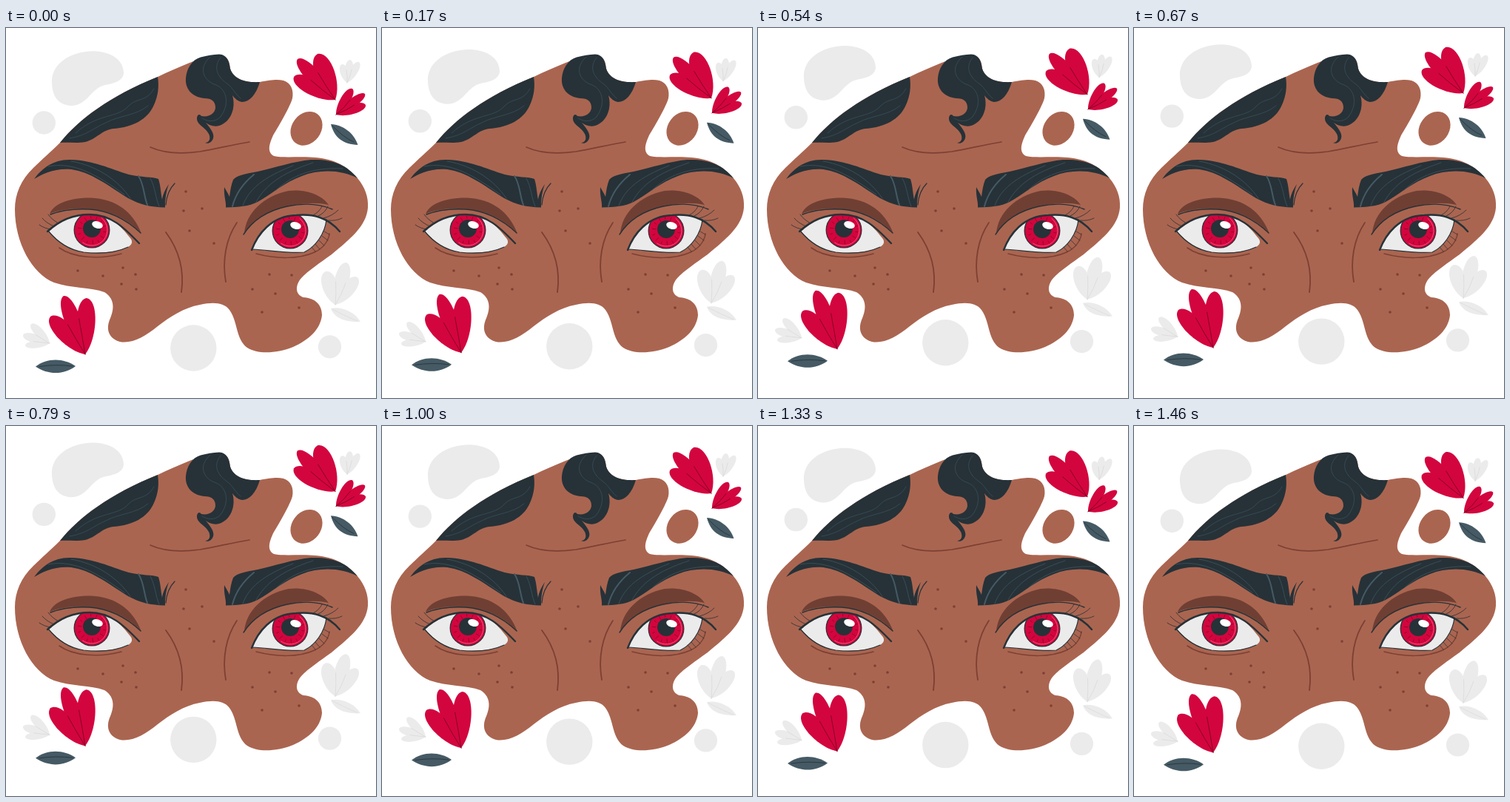
Write an HTML page with a canvas that moves like this. It is 500 px wide and 500 px high and loops after 1500 ms.

```html
<!DOCTYPE html>
<html lang="en">
<head>
<meta charset="utf-8">
<title>Angry eyes</title>
<style>
html, body { margin: 0; width: 100%; height: 100%; overflow: hidden; background: #fff; }
canvas { display: block; width: 100vw; height: 100vh; }
</style>
</head>
<body>
<canvas id="stage" width="500" height="500"></canvas>
<script>
const ctx = document.getElementById('stage').getContext('2d');
const LOOP = 1500, STEPS = 36, LIFT = 10, PHASE = 0.7;
const SKIN = '#aa6550', SHADE = '#703f33', CREASE = '#7c4033', DARK = '#263238';
const SLATE = '#455a64', RED = '#d3053e', WINE = '#7d0326', GRAY = '#ebebeb', GRAY_LINE = '#dcdcdc';

function fill(path, color) {
  ctx.fillStyle = color;
  ctx.fill(new Path2D(path));
}

function line(path, color, width) {
  ctx.strokeStyle = color;
  ctx.lineWidth = width;
  ctx.stroke(new Path2D(path));
}

function oval(x, y, rx, ry, color, angle = 0) {
  ctx.fillStyle = color;
  ctx.beginPath();
  ctx.ellipse(x, y, rx, ry, angle, 0, Math.PI * 2);
  ctx.fill();
}

const disc = (x, y, r, color) => oval(x, y, r, r, color);

// Each petal is [tip x, tip y, width], growing from a shared base.
function flower(x, y, petals, color, veinColor) {
  for (const [tipX, tipY, w] of petals) {
    const length = Math.hypot(tipX - x, tipY - y);
    ctx.save();
    ctx.translate(x, y);
    ctx.rotate(Math.atan2(tipY - y, tipX - x));
    ctx.scale(length, w);
    fill('M0 0C.3 -.72 .97 -.72 1 0C.97 .72 .3 .72 0 0Z', color);
    ctx.restore();
  }
  petals.slice(1).forEach(([tipX, tipY], i) => {
    const midX = (tipX + petals[i][0]) / 2 - x, midY = (tipY + petals[i][1]) / 2 - y;
    line(`M${x} ${y}Q${x + midX * .35 + 1} ${y + midY * .3} ${x + midX * .62} ${y + midY * .62}`, veinColor, .9);
  });
}

function leaf(path, vein, color, veinColor) {
  fill(path, color);
  line(vein, veinColor, .8);
}

function drawFloating() {
  fill('M62 75C60 50 85 31.5 118 31.2C145 32 159 45 159 61C158 72 145 75 134 77C115 81 110 105 88 105C70 104 63 92 62 75Z', GRAY);
  disc(51.3, 128, 15.7, GRAY);
  disc(253.3, 432.5, 31.2, GRAY);
  disc(437.5, 430.8, 15.6, GRAY);

  flower(461, 74, [[454, 49, 10], [465, 43, 10], [477, 46, 10]], GRAY, GRAY_LINE);
  flower(59, 426, [[34, 400, 11], [23, 415, 11], [26, 429, 9]], GRAY, GRAY_LINE);
  flower(445, 374, [[432, 329, 19], [460, 317, 18], [475, 337, 17]], GRAY, GRAY_LINE);
  leaf('M439 379C452 376 471 383 479 397C461 398 444 393 439 379Z', 'M441 380Q460 390 475 396', GRAY, GRAY_LINE);

  flower(445, 97, [[389, 66, 20], [394, 42, 18], [421, 35, 24]], RED, WINE);
  flower(446, 117, [[468, 82, 12], [485, 89, 11], [486, 104, 12]], RED, WINE);
  flower(107, 441, [[60, 390, 22], [78, 362, 20], [109, 365, 23]], RED, WINE);
  leaf('M439 130C456 131 470 142 475.5 158C456 157 444 149 439 130Z', 'M441 132Q456 148 470 154', SLATE, DARK);
  leaf('M40 457.5C55 445.5 78 445.5 94 457C78 469 57 469 40 457.5Z', 'M45 457.5Q68 454 90 457', SLATE, DARK);
}

function drawHair() {
  fill('M73 155C98 124 140 92 205 66C207 78 206 92 199 106C191 123 172 134 146 136C130 137 123 150 107 154C95 156 84 154 73 155Z', DARK);
  fill('M263 39.5C272 37 280 36 288 35.5C299 36 302 46 303 55C308 70 325 74 343 73C338 90 329 100 319 100C313 99 309 95 306 91' +
    'C311 108 304 127 288 132C281 134 274 131 270 128C276 135 282 143 280 149C278 155 273 157 269 155C275 155 277 149 274 143' +
    'C270 134 257 131 258 121C259 116 262 116 264 119C274 121 282 116 283 108C283 99 278 95 268 95C250 93 242 81 243 68C244 55 251 43 263 39.5Z', DARK);
  [
    'M200 82C190 100 177 94 166 105C150 123 125 114 94 142',
    'M192 105C175 119 153 118 135 128C120 134 108 146 86 149',
    'M276 39C258 55 268 72 284 77C300 84 302 105 289 121C281 128 272 126 265 122',
    'M290 40C278 55 288 68 300 76C307 82 309 88 317 95'
  ].forEach(path => line(path, '#40545e', .7));
}

function drawBrows() {
  fill('M38 204C49 189 65 177 88 178C118 179 140 190 166 198C183 202 198 201 206 204C209 213 209 222 211 232C212 224 216 217 220 211' +
    'C216 222 215 232 215 242.5C195 242 182 239 165 230C135 211 115 195 88 191C66 189 50 197 38 204Z', DARK);
  line('M216 239C217 226 221 217 228 210', DARK, 1.2);
  fill('M475 203C460 184 440 177 412 178C390 180 362 189 340 194C322 197 311 200 307 205C304 213 303 220 302 228C300 223 297 219 295 215' +
    'C294 227 298 236 297 242.5C315 242 328 241 340 235C360 224 375 209 400 200C425 190 455 192 475 203Z', DARK);
  line('M179 200C187 212 186 227 191 239', SLATE, 2);
  line('M306 241C310 225 318 212 335 198', SLATE, 2);
  [
    'M57 187C92 180 124 199 160 225', 'M88 180C122 186 150 204 168 230', 'M195 203C202 216 202 230 207 241',
    'M320 240C328 218 347 202 388 186', 'M338 235C350 213 372 196 415 182', 'M365 219C386 200 412 188 455 190'
  ].forEach(path => line(path, SLATE, .7));
}

function drawIris(x, y) {
  disc(x, y, 24.5, DARK);
  disc(x, y, 23.3, RED);
  ctx.strokeStyle = '#ef577c';
  ctx.lineWidth = 1;
  ctx.beginPath();
  ctx.arc(x, y, 21, -.9, 2.2);
  ctx.stroke();
  for (let i = 0; i < 14; i++) {
    const a = i * Math.PI / 7 + .15, inner = i % 2 ? 14 : 16;
    const dx = Math.cos(a), dy = Math.sin(a);
    line(`M${x + dx * inner} ${y + dy * inner}L${x + dx * 19} ${y + dy * 19}`, WINE, .7);
  }
  disc(x, y - 2, 12, DARK);
  oval(x + 7.5, y - 7, 7.5, 4.8, '#fff', .3);
}

function drawEye(white, x, y) {
  fill(white, GRAY);
  ctx.save();
  ctx.clip(new Path2D(white));
  drawIris(x, y);
  ctx.restore();
}

function drawEyes() {
  fill('M59 251C65 236 90 229 115 229.5C148 231 172 248 183 278C165 258 140 246 110 244.5C90 243 72 246 59 251Z', SHADE);
  fill('M322 278C324 250 348 227 382 220C405 217 428 226 436 239C415 234 390 238 370 244C345 252 333 262 322 278Z', SHADE);

  drawEye('M58 275C74 261 92 252 113 252C140 252 154 266 168 284C172 289 170 293 165 296C150 303 125 305 105 303C85 300 70 288 58 275Z', 116, 273);
  line('M60 252C78 245 95 244 113 245C142 247 165 261 182 277', DARK, 1.4);
  line('M56 275C72 260 92 252 113 252C142 252 160 270 180 291', DARK, 2.4);
  line('M57 274C70 290 85 300 105 303C130 306 150 303 165 296', DARK, 1.2);
  line('M72 297C91 311 127 313 156 305', CREASE, 1.6);
  line('M61 272Q52 271 45 266M65 268Q55 264 49 257M71 264Q62 259 57 252', DARK, .8);

  drawEye('M333 299C340 279 358 254 392 253C412 251 425 254 433 259C431 278 418 296 403 303C382 305 355 300 333 299Z', 384, 274);
  line('M321 279C335 257 357 246 380 241C404 236 425 238 441 245', DARK, 1.4);
  line('M332 300C340 279 358 254 392 253C414 251 434 255 451 275', DARK, 2.4);
  line('M333 299C355 300 382 305 403 303C418 296 431 278 433 259', DARK, 1.2);
  line('M338 305C365 312 395 313 417 303C428 298 436 288 437 278', CREASE, 1.5);
  line('M415 253Q423 249 427 241M422 254Q431 250 435 241M429 257Q441 254 449 246M436 260Q446 261 454 257', DARK, .8);
  line('M413 296L418 302M418 292L424 299M423 287L430 294M427 281L435 287M430 275L437 279', DARK, .7);
}

function drawFace() {
  oval(406, 135.8, 19.7, 24.5, SKIN, .65);
  fill('M73 155C98 124 140 92 205 66C235 52 262 40 284 36C300 36 302 45 303 55C308 70 325 74 343 73C358 70 367 69 375 71' +
    'C385 74 389 84 387 95C384 106 370 130 361 145C355 158 353 168 362 173C375 176 400 173 418 175C446 177 463 189 475 203' +
    'C485 215 490 228 489 243C487 268 464 286 440 306C425 317 408 328 399 338C391 347 390 360 402 364C418 365 427 374 427 388' +
    'C425 408 408 422 388 431C365 440 340 441 326 432C310 420 314 398 302 381C295 371 280 370 262 374C240 378 222 390 205 403' +
    'C188 417 170 427 154 424C137 419 135 405 141 392C147 378 146 365 133 357C115 350 88 352 65 344C35 332 12 290 12 245C12 225 20 205 37 189C48 178 60 168 73 155Z', SKIN);
  drawHair();
  line('M195 161C215 170 240 170 262 167C285 163 305 158 329 154', CREASE, 1.6);
  line('M216 276C230 295 242 322 237 357M312 263C297 285 292 315 297 343', CREASE, 1.8);
  drawBrows();
  drawEyes();
  [[243, 221], [240, 247], [265, 244], [248, 274], [281, 291], [97, 328], [131, 335], [158, 324], [175, 333],
   [156, 346], [176, 353], [356, 333], [386, 334], [333, 353], [364, 359], [396, 378], [346, 384]
  ].forEach(([x, y]) => disc(x, y, 1.8, CREASE));
}

const liftAt = step => LIFT * (1 - Math.abs(2 * (step + PHASE) / STEPS - 1));

function draw() {
  const step = Math.floor((performance.now() + 4) % LOOP / LOOP * STEPS);
  ctx.fillStyle = '#fff';
  ctx.fillRect(0, 0, 500, 500);
  ctx.lineCap = 'round';
  ctx.save();
  ctx.translate(0, liftAt(0) - liftAt(step));
  drawFloating();
  ctx.restore();
  drawFace();
  requestAnimationFrame(draw);
}
draw();
</script>
</body>
</html>
```
